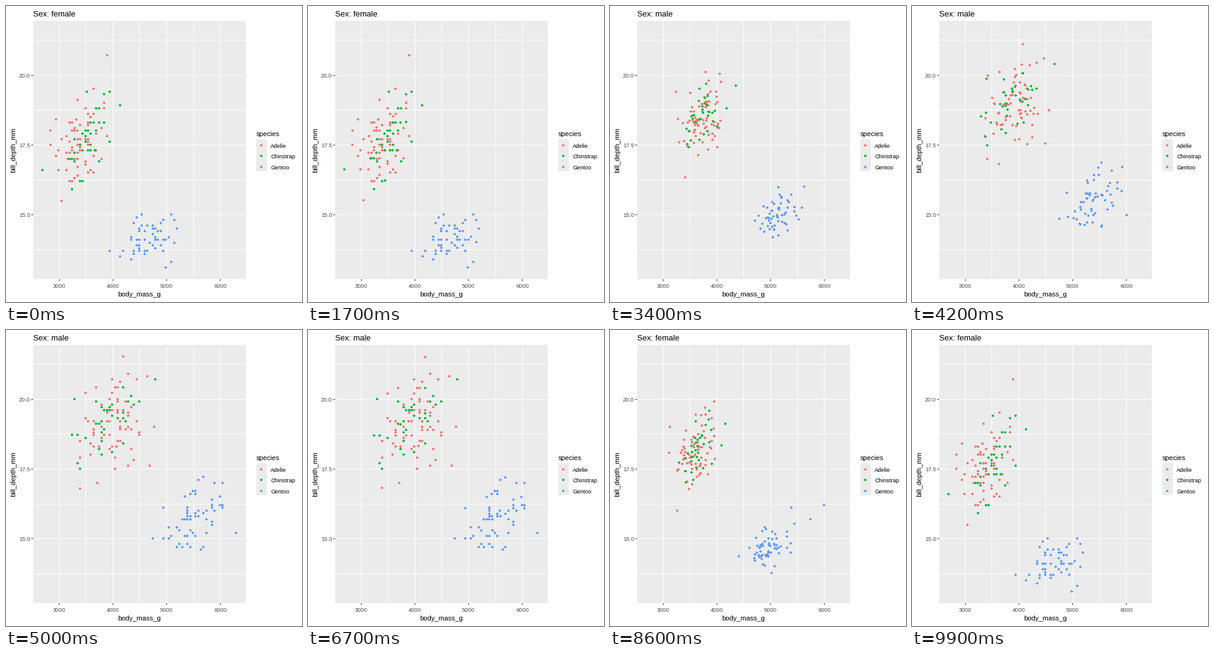
These frames come from a looping animation (480x480 px, 10000 ms). A matplotlib script:

```python
import numpy as np
import matplotlib.pyplot as plt
from matplotlib.animation import FuncAnimation
from matplotlib.patches import Rectangle

SIZE, FRAMES, INTERVAL = 480, 100, 100
LEFT, RIGHT, TOP, BOTTOM = 44, 389, 24, 443
GREY = "#EBEBEB"
COLORS = {"Adelie": "#F8766D", "Chinstrap": "#00BA38", "Gentoo": "#619CFF"}
DOT = [(-1, 2), (1, 2), (1, 1), (2, 1), (2, -1), (1, -1),
       (1, -2), (-1, -2), (-1, -1), (-2, -1), (-2, 1), (-1, 1), (-1, 2)]

plt.rcParams["font.family"] = "Liberation Sans"
rng = np.random.default_rng(12)


def to_x(mass):
    return 43.9 + (np.asarray(mass) - 2520) * 345 / 3960


def to_y(depth):
    return 43.49 + (21.5 - np.asarray(depth)) * 45.35


def spread(count, mass, mass_sd, depth, depth_sd, slope):
    """Correlated bell-shaped cloud, rounded like measured values."""
    u, v = np.clip(rng.normal(size=(2, count)), -2, 2)
    w = slope * u + np.sqrt(1 - slope ** 2) * v
    return np.column_stack([np.round((mass + mass_sd * u) / 50) * 50,
                            np.round(depth + depth_sd * w, 1)])


def pixels(values):
    return np.column_stack([to_x(values[:, 0]), to_y(values[:, 1])])


def group(count, female, male, outliers):
    """Pairs of positions; each outlier is (mass, depth) twice."""
    outliers = np.array(outliers)
    rest = count - len(outliers)
    return (pixels(np.vstack([outliers[:, :2], spread(rest, *female)])),
            pixels(np.vstack([outliers[:, 2:], spread(rest, *male)])))


groups = [
    group(73, (3370, 265, 17.6, 0.85, 0.4), (4020, 320, 19.05, 0.9, 0.3),
          [(3900, 20.7, 4075, 18.3), (3050, 15.5, 3725, 17.0),
           (3325, 18.4, 4200, 21.5), (3200, 17.2, 4700, 17.6),
           (3175, 17.0, 4775, 19.0)]),
    group(34, (3520, 220, 17.55, 0.72, 0.6), (3940, 290, 19.2, 0.65, 0.5),
          [(2700, 16.6, 4500, 19.9), (4150, 18.9, 3300, 20.0),
           (3850, 18.3, 4800, 20.7), (3525, 19.4, 3800, 18.8),
           (3675, 17.3, 3250, 18.7), (3600, 17.3, 3400, 17.5)]),
    group(58, (4670, 260, 14.25, 0.5, 0.5), (5480, 280, 15.7, 0.68, 0.4),
          [(3950, 13.7, 5350, 15.7), (4150, 13.5, 6300, 15.2),
           (5000, 13.1, 5100, 15.1), (5100, 13.3, 5050, 15.4),
           (5150, 14.8, 6050, 17.0), (4900, 13.9, 4750, 15.0)]),
]
females, males = (np.vstack(side) for side in zip(*groups))
# Males without a female partner stand still and pop in and out.
unpaired = pixels(np.array([(6000, 16.2), (5750, 15.7), (5400, 16.1)]))
dot_colors = np.repeat(list(COLORS.values()), [73, 34, 58 + len(unpaired)])

fig = plt.figure(figsize=(SIZE / 72, SIZE / 72), dpi=72, facecolor="white")
ax = fig.add_axes([0, 0, 1, 1])
ax.set(xlim=(0, SIZE), ylim=(SIZE, 0))
ax.axis("off")


def box(x, y, width, height, color):
    ax.add_patch(Rectangle((x, y), width, height, facecolor=color,
                           linewidth=0, antialiased=False))


def label(x, y, text, size, color="black", **style):
    style = {"va": "baseline", **style}
    return ax.text(x, y, text, fontsize=size, color=color, **style)


def snap(xy):
    return np.column_stack([np.floor(xy[:, 0]), np.round(xy[:, 1])])


def dots(xy, colors):
    return ax.scatter(xy[:, 0], xy[:, 1], s=16, c=colors, marker=DOT,
                      linewidths=0, zorder=3)


box(LEFT, TOP, RIGHT - LEFT, BOTTOM - TOP, GREY)
for mass in range(3000, 6001, 500):
    x = round(float(to_x(mass)))
    box(x, TOP, 1, BOTTOM - TOP, "white")
    if mass % 1000 == 0:
        box(x, BOTTOM, 1, 3, "#333333")
        label(x + 0.5, 457, str(mass), 9.3, "#4D4D4D", ha="center")
for depth in np.arange(13.75, 21.5, 1.25):
    y = round(float(to_y(depth)))
    box(LEFT, y, RIGHT - LEFT, 1, "white")
    if depth % 2.5 == 0:
        box(LEFT - 3, y, 3, 1, "#333333")
        label(39, y + 4, f"{depth:.1f}", 9.3, "#4D4D4D", ha="right")

title = label(44, 17, "Sex: female", 13)
label(216.5, 471, "body_mass_g", 11.2, ha="center")
label(17, 233.5, "bill_depth_mm", 11.2, rotation=90, ha="right", va="center")

label(406, 211, "species", 11.2)
box(406, 216, 17, 52, GREY)
for row, (name, color) in enumerate(COLORS.items()):
    y = 226 + row * 17.28
    dots(snap(np.array([[414, y]])), [color])
    label(429, round(y) + 4, name, 9.3)

cloud = dots(np.vstack([females, unpaired]), dot_colors)


def ease(t):
    return (1 - np.cos(np.pi * np.clip(t, 0, 1))) / 2


def update(frame):
    share = ease((frame - 16) / 34) - ease((frame - 66) / 33)
    moving = females + (males - females) * share
    extra = unpaired if 50 <= frame < 99 else np.full_like(unpaired, -50)
    cloud.set_offsets(snap(np.vstack([moving, extra])))
    title.set_text("Sex: male" if 34 <= frame < 83 else "Sex: female")
    return cloud, title


anim = FuncAnimation(fig, update, frames=FRAMES, interval=INTERVAL,
                     repeat=True, repeat_delay=0)
plt.show()
```
